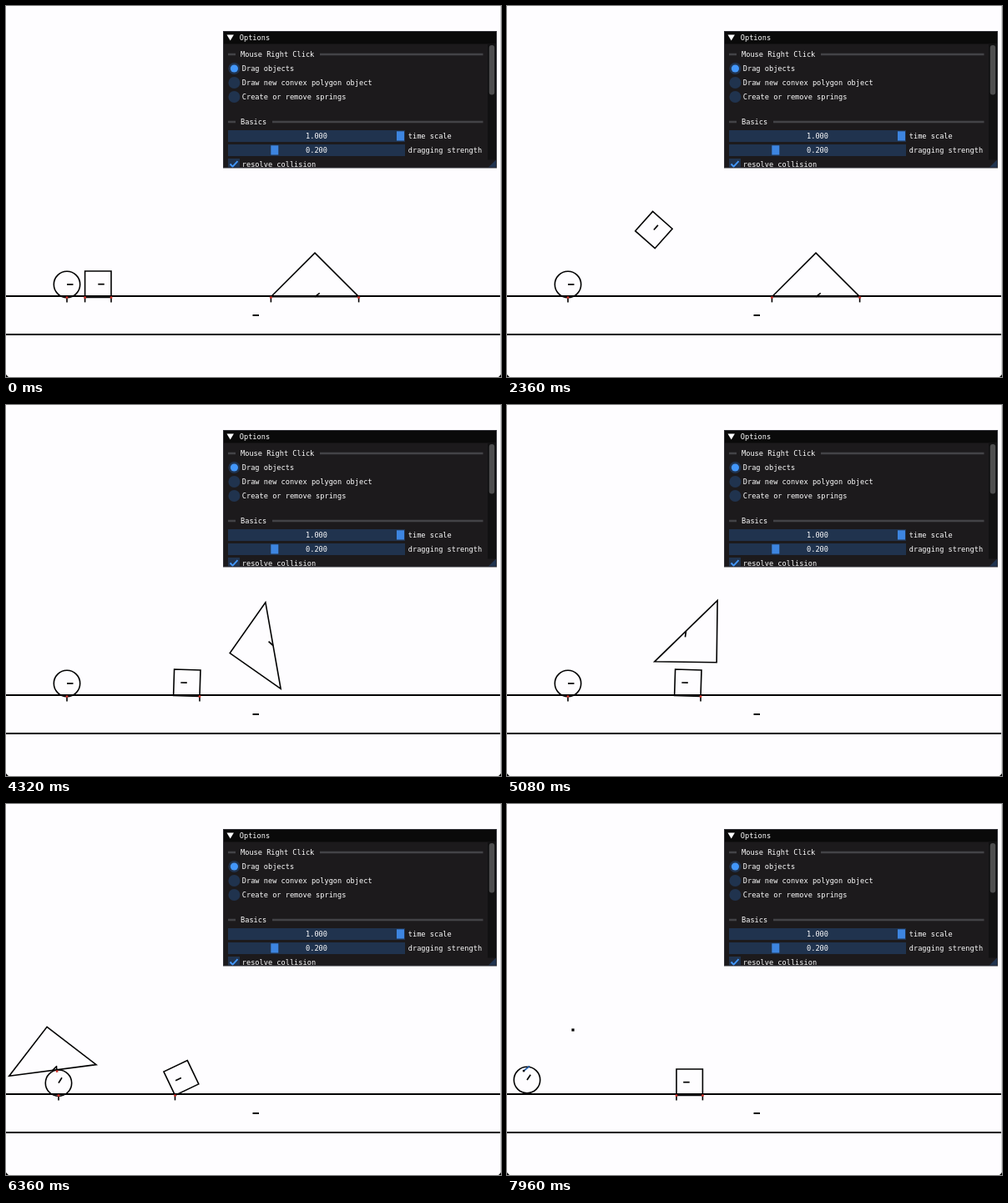
Animation of 593 by 445 pixels, one loop 8 s. Source, as an HTML page with a canvas:

```html
<!DOCTYPE html>
<html lang="en">
<head>
<meta charset="utf-8">
<title>Rigid body sandbox</title>
<style>
  html, body { margin: 0; width: 100%; height: 100%; overflow: hidden; background: #fefdff; }
  canvas, svg { position: absolute; left: 0; top: 0; width: 593px; height: 445px; }
  text { font: 8.64px "DejaVu Sans Mono", monospace; fill: #fff; white-space: pre; }
  .mid { text-anchor: middle; }
  .frame { fill: #20334e; }
  .grab { fill: #3d85e0; }
  .rule { stroke: #434347; stroke-width: 2.4; }
</style>
</head>
<body>
<canvas id="scene" width="593" height="445"></canvas>
<svg viewBox="0 0 593 445">
  <clipPath id="body"><rect x="261" y="46" width="326" height="147.5"/></clipPath>
  <rect x="260.5" y="30.5" width="327" height="163.5" fill="#1c1a1c" stroke="#303036"/>
  <rect x="261" y="31" width="326" height="14.5" fill="#0a0a0a"/>
  <path d="M264.5 34.5h8.4l-4.2 7z" fill="#fff"/>
  <text x="279.8" y="41">Options</text>
  <g clip-path="url(#body)">
    <path class="rule" d="M266 58h9M376 58h195.5M266 139h9M319 139h252.5"/>
    <text x="281" y="61">Mouse Right Click</text>
    <g class="frame">
      <circle cx="273.4" cy="75" r="7"/><circle cx="273.4" cy="92" r="7"/><circle cx="273.4" cy="109" r="7"/>
      <rect x="266" y="149" width="212" height="14"/><rect x="266" y="166" width="212" height="14"/>
      <rect x="266" y="183" width="14" height="14"/>
      <path d="M587 184.5v9.5h-9.5z"/>
    </g>
    <circle cx="273.4" cy="75" r="4.6" fill="#4296fa"/>
    <text x="282.8" y="78">Drag objects</text>
    <text x="282.8" y="95">Draw new convex polygon object</text>
    <text x="282.8" y="112">Create or remove springs</text>
    <text x="281" y="142">Basics</text>
    <rect class="grab" x="468" y="150.3" width="9" height="11.2"/>
    <rect class="grab" x="317.3" y="167.3" width="9" height="11.2"/>
    <text class="mid" x="372" y="159">1.000</text>
    <text class="mid" x="372" y="176">0.200</text>
    <text x="481.8" y="159">time scale</text>
    <text x="481.8" y="176">dragging strength</text>
    <path d="M268.5 189.5l3 3.2l6-6.5" fill="none" stroke="#4296fa" stroke-width="1.9"/>
    <text x="282.8" y="193">resolve collision</text>
    <rect x="577" y="46" width="10" height="138.5" fill="#111112"/>
    <rect x="578.8" y="47" width="6.4" height="59.5" rx="3" fill="#4e4e4f"/>
  </g>
  <path d="M592.5 0V445" stroke="#d2d2d4"/>
  <path d="M0 442v3h3zM593 442v3h-3z"/>
</svg>
<script>
const LOOP = 8000, STEP = 40, FLOOR = 349.4, RAD = Math.PI / 180;
const HALF_GRAVITY = 55.4, RADIUS = 15.7, BOX = 15.7, WEDGE = 52.6;
const ctx = document.getElementById('scene').getContext('2d');

const pose = (x, y, angle) => ({ x, y, angle });
const mix = (a, b, u) => a + (b - a) * u;
const range = (t, from, to) => Math.min(1, Math.max(0, (t - from) / (to - from)));
const smooth = u => u * u * (3 - 2 * u);
const polar = (r, deg) => [r * Math.cos(deg * RAD), r * Math.sin(deg * RAD)];

function toWorld({ x, y, angle }, [px, py]) {
  const c = Math.cos(angle * RAD), s = Math.sin(angle * RAD);
  return [x + px * c - py * s, y + px * s + py * c];
}

// Free flight: s is in seconds, velocities are per second.
const flight = (start, vx, vy, spin, s) =>
  pose(start.x + vx * s, start.y + vy * s + HALF_GRAVITY * s * s, start.angle + spin * s);

// The box stands on one corner, at `side` degrees from its centre line.
function onCorner(pivot, side, angle) {
  const [dx, dy] = polar(BOX * Math.SQRT2, side);
  return pose(pivot + dx, FLOOR + dy, angle);
}

function boxAt(t) {
  const thrown = s => flight(pose(150.7, 271.7, -20.5), 70, -28.8, -77.5, s);
  if (t < 2000) {
    const u = range(t, 1500, 2000), end = thrown(0);
    return pose(mix(110.3, end.x, u * u), mix(333.7, end.y, smooth(u)), end.angle * u * u);
  }
  if (t < 3300) return thrown((t - 2000) / 1000);
  if (t < 5440) {
    const u = range(t, 3300, 3800), angle = mix(-121, -178.2, u ** 1.3);
    return onCorner(mix(235.8, 232, u), angle + 45, angle);
  }
  const u = range(t, 5440, 7060), tilt = 26 * 4 * u * (1 - u);
  return onCorner(mix(201, 203, Math.sqrt(u)), -45 - tilt, -180 - tilt);
}

function diskAt(t) {
  const roll = range(t, 5870, 7960), pull = range(t, 7650, 7960) ** 2;
  return pose(73 - 54 * smooth(range(t, 5870, 7650)) + 5 * pull,
    334 + Math.sin(Math.PI * roll) - 3 * pull, -416 * smooth(roll));
}

function wedgeAt(t) {
  const thrown = s => flight(pose(320, 288.5, -100), -138.9, -65, -163.5, s);
  if (t < 4320) {
    const u = range(t, 3650, 4320), end = thrown(0);
    return pose(mix(370, end.x, u ** 1.9), mix(348.8, end.y, u * (1.27 - 0.27 * u)), end.angle * u ** 1.5);
  }
  if (t < 5870) return thrown((t - 4320) / 1000);
  // The base stays tangent to the disk, then the wedge drops off the edge.
  const at = Math.min(t, 6960), u = range(at, 5870, 6960), disk = diskAt(at);
  const x = mix(105, -4.2, u), angle = mix(-354, -392, u ** 1.3), a = angle * RAD;
  const y = disk.y - 16 / Math.cos(a) + (x - disk.x) * Math.tan(a);
  return flight(pose(x, y, angle), -100, 100, -80, (t - at) / 1000);
}

const drags = [
  { at: boxAt, local: [3, 0], from: 1320, to: 2000, path: [[114, 333], [124, 248], [190, 251]] },
  { at: wedgeAt, local: [22, -18], from: 3560, to: 4240, path: [[392, 330], [366, 240], [308, 240]] },
  { at: diskAt, local: polar(11.6, 306), from: 7360, to: 7960, path: [[24, 325], [60, 268], [79, 271]] }
];

const boxCorners = [[-BOX, -BOX], [BOX, -BOX], [BOX, BOX], [-BOX, BOX]];
const wedgeCorners = [[-WEDGE, 0], [0, -WEDGE], [WEDGE, 0]];

function line(x1, y1, x2, y2, color = '#000', width = 2) {
  ctx.strokeStyle = color;
  ctx.lineWidth = width;
  ctx.beginPath();
  ctx.moveTo(x1, y1);
  ctx.lineTo(x2, y2);
  ctx.stroke();
}

function contact(x, y, nx, ny) {
  line(x, y, x + nx * 6, y + ny * 6, '#000', 1.6);
  line(x - nx, y - ny, x + nx * 1.4, y + ny * 1.4, '#d3332b', 2.6);
}

function outline(trace, place, mark) {
  ctx.strokeStyle = '#000';
  ctx.lineWidth = 1.6;
  ctx.beginPath();
  trace();
  ctx.closePath();
  ctx.stroke();
  line(place.x, place.y, ...toWorld(place, mark), '#000', 1.7);
}

function polygon(place, corners, mark) {
  const points = corners.map(corner => toWorld(place, corner));
  outline(() => points.forEach(point => ctx.lineTo(...point)), place, mark);
  for (const [x, y] of points) if (x > 0 && y > FLOOR - 0.8) contact(x, FLOOR, 0, 1);
}

function drawDrag({ at, local, from, to, path }, t) {
  const [x, y] = toWorld(at(t), local), u = range(t, from, to);
  const [mx, my] = [0, 1].map(k =>
    mix(mix(path[0][k], path[1][k], u), mix(path[1][k], path[2][k], u), u));
  const length = Math.hypot(mx - x, my - y) || 1, pull = Math.min(9, length) / length;
  line(x, y, mix(x, mx, pull), mix(y, my, pull), '#1b57a6', 1.8);
  ctx.fillStyle = '#000';
  ctx.fillRect(x - 1.2, y - 1.2, 2.4, 2.4);
  ctx.fillRect(mx - 1.6, my - 1.6, 3.2, 3.2);
}

function draw(t) {
  const disk = diskAt(t), wedge = wedgeAt(t);
  ctx.clearRect(0, 0, 593, 445);
  line(0, 348, 593, 348);
  line(0, 394, 593, 394);
  line(295.5, 371, 303, 371);

  outline(() => ctx.arc(disk.x, disk.y, RADIUS, 0, 2 * Math.PI), disk, [7.5, 0]);
  polygon(boxAt(t), boxCorners, [7.5, 0]);
  polygon(wedge, wedgeCorners, [5.7, -4.5]);

  if (disk.y > 333.5) contact(disk.x, FLOOR, 0, 1);
  if (t >= 5870 && t < 7000) {
    const [nx, ny] = polar(1, wedge.angle - 90);
    contact(disk.x + nx * 14, disk.y + ny * 14, nx, ny);
  }
  for (const drag of drags) if (t >= drag.from && t <= drag.to) drawDrag(drag, t);
}

function tick() {
  draw(Math.floor(performance.now() % LOOP / STEP) * STEP);
  requestAnimationFrame(tick);
}
tick();
</script>
</body>
</html>
```
